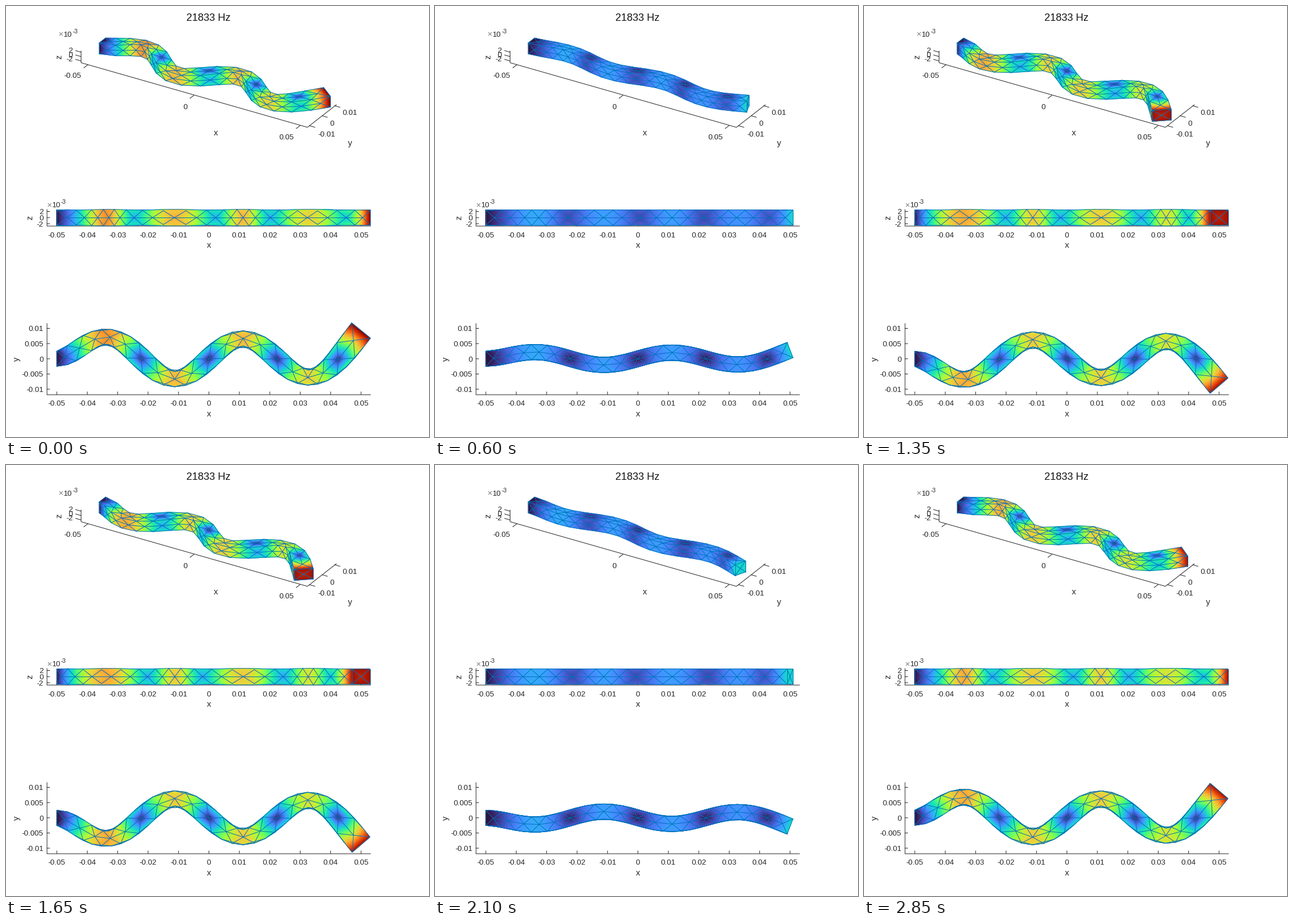
Recreate the animation shown at these times as a matplotlib script. Size 741 by 756 pixels, loop 3000 ms.

```python
import numpy as np
import matplotlib.pyplot as plt
from matplotlib.animation import FuncAnimation
from matplotlib.collections import LineCollection

W, H = 741, 756
FRAMES, INTERVAL = 20, 150
INK = (0.15, 0.15, 0.15)
EDGE = (0.0, 0.447, 0.741)
PT = 0.72                     # points per pixel at 100 dpi

LENGTH, HALF = 0.1, 0.0025
POISSON = 0.3
SPLIT = 5                     # subdivisions of each triangle side for shading
THIN = 2.9                    # pixels

plt.rcParams["font.family"] = "Liberation Sans"
fig = plt.figure(figsize=(W / 100, H / 100), dpi=100, facecolor="white")
ax = fig.add_axes([0, 0, 1, 1])
ax.set_xlim(-0.5, W - 0.5)
ax.set_ylim(H - 0.5, -0.5)
ax.axis("off")


# ---- beam mesh: X-patterned strips around a square bar ----

def build_mesh():
    points, tris = [], []

    def add(x, y, z):
        points.append((x, y, z))
        return len(points) - 1

    # cells are a little longer in the middle of the bar
    outer = np.linspace(0.025, LENGTH / 2, 6)
    xs = np.concatenate([-outer[::-1], np.linspace(-0.0197, 0.0197, 8), outer])
    corners = [(-HALF, -HALF), (HALF, -HALF), (HALF, HALF), (-HALF, HALF)]
    rails = [[add(x, y, z) for x in xs] for y, z in corners]

    for k in range(4):
        a, b = rails[k], rails[(k + 1) % 4]
        (ya, za), (yb, zb) = corners[k], corners[(k + 1) % 4]
        centres = [add(x, (ya + yb) / 2, (za + zb) / 2)
                   for x in (xs[1:] + xs[:-1]) / 2]
        tris.append((a[0], b[0], centres[0]))
        tris.append((a[-1], centres[-1], b[-1]))
        for i, c in enumerate(centres):
            tris.append((a[i], c, a[i + 1]))
            tris.append((b[i], b[i + 1], c))
        for i, (c, d) in enumerate(zip(centres, centres[1:]), 1):
            tris.append((c, d, a[i]))
            tris.append((c, b[i], d))

    left, right = add(xs[0], 0, 0), add(xs[-1], 0, 0)
    for k in range(4):
        p, q = rails[k], rails[(k + 1) % 4]
        tris.append((right, p[-1], q[-1]))
        tris.append((left, q[0], p[0]))
    return np.array(points), np.array(tris)


def mode_shape(points):
    """Fifth bending mode of a cantilever, with section rotation."""
    s = np.linspace(0, 1, 2001)
    root = 14.13717
    b = root * s
    ratio = (np.cosh(root) + np.cos(root)) / (np.sinh(root) + np.sin(root))
    shape = np.cosh(b) - np.cos(b) - ratio * (np.sinh(b) - np.sin(b))
    bend = (0.00484 - 0.00019 * s) * shape
    turn = 0.94 * np.gradient(bend, s * LENGTH)
    curve = np.gradient(turn, s * LENGTH)
    curve[0] = 0

    x, y, z = points.T
    at = x / LENGTH + 0.5
    v = np.interp(at, s, bend)
    u = -y * np.interp(at, s, turn)
    w = POISSON * np.interp(at, s, curve) * y * z
    return np.column_stack([u, v, w])


def subdivision(n):
    """Barycentric weights and small triangles of one split triangle."""
    index, weights = {}, []
    for i in range(n + 1):
        for j in range(n + 1 - i):
            index[i, j] = len(weights)
            weights.append((i / n, j / n, (n - i - j) / n))
    small = []
    for i in range(n):
        for j in range(n - i):
            small.append((index[i, j], index[i + 1, j], index[i, j + 1]))
            if i + j < n - 1:
                small.append((index[i + 1, j], index[i + 1, j + 1],
                              index[i, j + 1]))
    return np.array(weights), np.array(small)


POINTS, TRIS = build_mesh()
SHAPE = mode_shape(POINTS)
SIZE = np.linalg.norm(SHAPE, axis=1)
WEIGHTS, SMALL = subdivision(SPLIT)

# (screen position of the beam centre, pixels per metre along x, y, z)
VIEWS = [
    ((354.6, 122.7), [[3725, 2255, 0], [1063, -1740, -3800]]),
    ((355.0, 370.7), [[5330, 0, 0], [0, 0, -5330]]),
    ((355.0, 618.3), [[5330, 0, 0], [0, -5330, 0]]),
]


def project(body, view):
    origin, matrix = view
    return body @ np.array(matrix).T + origin


def facing(flat):
    """Twice the screen area of each triangle, positive towards the viewer."""
    p, q, r = (flat[TRIS[:, k]] for k in range(3))
    d, e = q - p, r - p
    return d[:, 1] * e[:, 0] - d[:, 0] * e[:, 1]


def wire_edges(tris, sliver):
    """Outline edges, and inner edges that do not border a sliver."""
    pairs = np.vstack([tris[:, [0, 1]], tris[:, [1, 2]], tris[:, [2, 0]]])
    edges, which, count = np.unique(np.sort(pairs, axis=1), axis=0,
                                    return_inverse=True, return_counts=True)
    slivers = np.bincount(which.ravel(), weights=np.tile(sliver, 3))
    return edges[(count == 1) | (slivers == 0)]


EDGE_ON = [facing(project(POINTS, view)) < 1 for view in VIEWS]
shown = []


def draw(frame):
    while shown:
        shown.pop().remove()
    swing = np.cos(2 * np.pi * frame / FRAMES)
    body = POINTS + swing * SHAPE
    value = abs(swing) * SIZE

    spots, values, lines = [], [], []
    for view, edge_on in zip(VIEWS, EDGE_ON):
        flat = project(body, view)
        area = facing(flat)
        sides = flat[TRIS] - flat[np.roll(TRIS, 1, axis=1)]
        longest = np.linalg.norm(sides, axis=2).max(axis=1)
        sliver = edge_on & (area < THIN * longest)
        seen = area > 0.05
        front = TRIS[seen]
        spots.append(np.einsum("wk,tkd->twd", WEIGHTS, flat[front]))
        values.append(value[front] @ WEIGHTS.T)
        lines.append(flat[wire_edges(front, sliver[seen])])

    spots = np.concatenate(spots)
    values = np.concatenate(values).ravel()
    offsets = np.arange(len(spots)) * len(WEIGHTS)
    small = (SMALL[None] + offsets[:, None, None]).reshape(-1, 3)
    xy = spots.reshape(-1, 2)
    skin = ax.tripcolor(xy[:, 0], xy[:, 1], small, values, shading="gouraud",
                        cmap="turbo", vmin=0, vmax=SIZE.max(), zorder=3)
    wires = LineCollection(np.concatenate(lines), colors=[EDGE],
                           linewidths=PT, capstyle="round", zorder=4)
    ax.add_collection(wires, autolim=False)
    shown.extend([skin, wires])
    return shown


# ---- axes, ticks and labels ----

def line(x0, y0, x1, y1):
    ax.plot([x0, x1], [y0, y1], color=INK, lw=PT, zorder=1,
            solid_capstyle="butt", snap=False)


def text(x, y, s, size=13.4, ha="center", drop=0.36, color=INK):
    ax.text(x, y + drop * size, s, fontsize=size * PT, ha=ha, va="baseline",
            color=color, zorder=2)


def name(x, y, s, upright=False):
    if upright:
        ax.text(x, y, s, fontsize=14.6 * PT, rotation=90, ha="center",
                va="center", color=INK, zorder=2)
    else:
        text(x, y, s, 14.6, drop=0.26)


def power(x, y):
    text(x, y, "×", 15, "left", 0.33, (0.5, 0.5, 0.5))
    text(x + 9, y, "10", 13.4, "left")
    text(x + 24.5, y - 5, "-3", 10.5, "left")


def flat_axes(top, bottom, labels_y, name_y):
    line(71.4, top, 71.4, bottom)
    line(71, bottom, 638.5, bottom)
    for k in range(-5, 6):
        x = 355 + 53.3 * k
        line(x, bottom, x, bottom - 5.5)
        text(x, labels_y, f"{k / 100:.2f}" if k else "0")
    name(355, name_y, "x")


def side_tick(y, s):
    line(71, y, 76.5, y)
    text(65, y, s, ha="right")


text(354.5, 18.5, "21833 Hz", 18.1, color=(0.08, 0.08, 0.08))

# oblique view
line(131, 78, 131, 99)
line(131, 99, 527.5, 212.3)
line(527.5, 212.3, 578.5, 172.5)
for x, y, s, tx, ty in [(143, 102.5, "-0.05", 116, 121),
                        (329, 156, "0", 314, 175.5),
                        (515, 209, "0.05", 491, 229)]:
    line(x, y, x - 7.5, y + 5.7)
    text(tx, ty, s)
for x, y, s, tx, ty in [(531, 209.5, "-0.01", 546, 223.5),
                        (553, 192, "0", 567.5, 205),
                        (575, 174.5, "0.01", 589, 186)]:
    line(x, y, x + 10, y + 2.8)
    text(tx, ty, s, ha="left")
for k, s in enumerate(["2", "0", "-2"]):
    line(131, 80.5 + 7.7 * k, 121, 77.6 + 7.7 * k)
    text(116.5, 76.5 + 7.7 * k, s, ha="right")
name(367, 223, "x")
name(602, 241, "y")
name(92.5, 88.5, "z", upright=True)
power(91.5, 48.5)

# side view
flat_axes(356, 385.5, 400.5, 420)
for k, s in enumerate(["2", "0", "-2"]):
    side_tick(360 + 10.7 * k, s)
name(42, 370.5, "z", upright=True)
power(71, 348)

# top view
flat_axes(556, 681.4, 695.5, 716)
for k, s in enumerate(["0.01", "0.005", "0", "-0.005", "-0.01"]):
    side_tick(565 + 26.65 * k, s)
name(18, 618.5, "y", upright=True)

anim = FuncAnimation(fig, draw, frames=FRAMES, interval=INTERVAL,
                     init_func=lambda: draw(0), repeat=True, repeat_delay=0,
                     blit=False)
plt.show()
```
